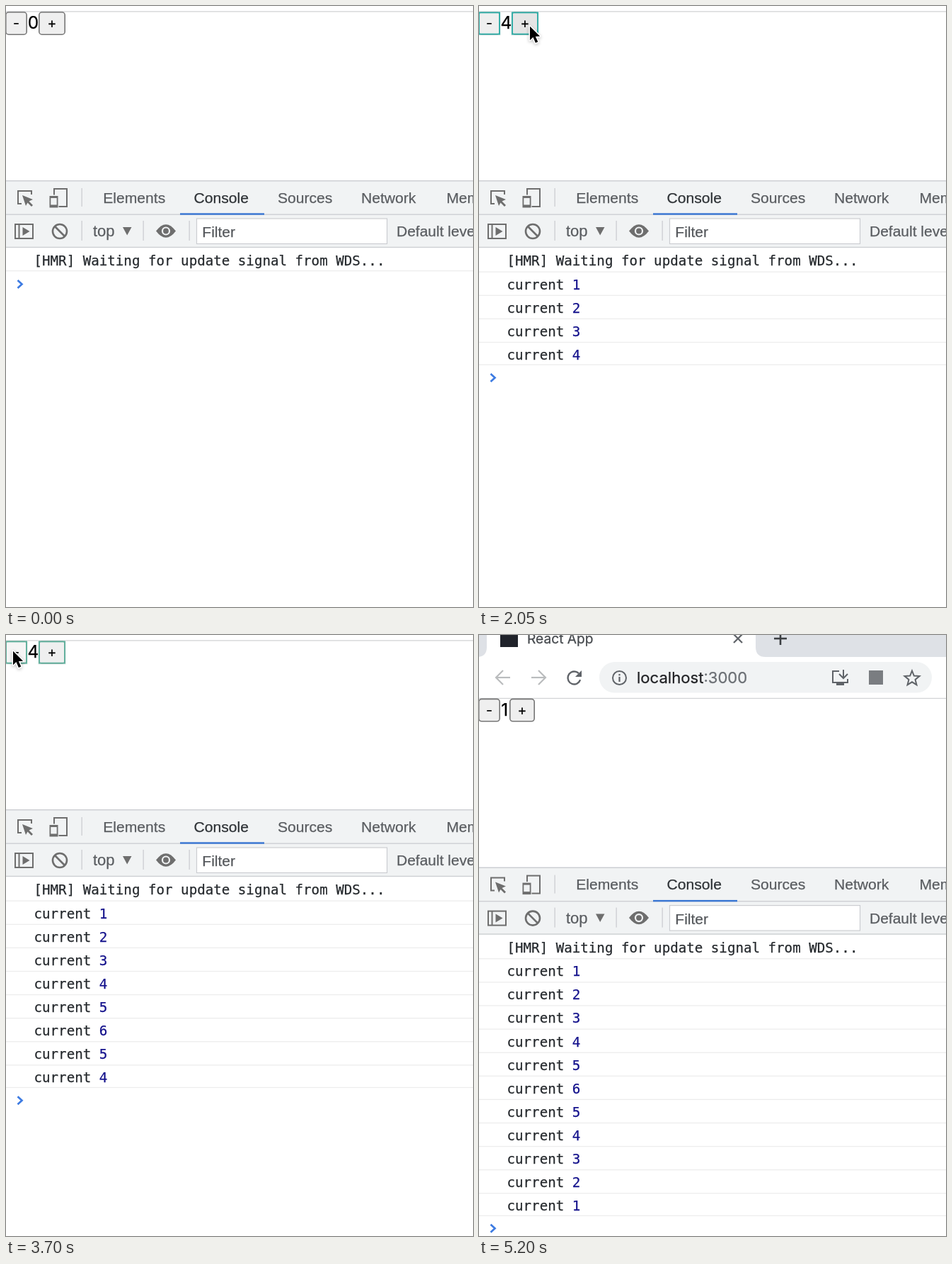
Write an HTML page with a canvas that moves like this. It is 660 px wide and 848 px high and loops after 5.54 s.

```html
<!DOCTYPE html>
<html lang="en">
<head>
<meta charset="utf-8">
<title>Counter</title>
<style>
  html, body { margin: 0; width: 100%; height: 100%; overflow: hidden; background: #fff; }
  canvas { display: block; width: 660px; height: 848px; }
</style>
</head>
<body>
<canvas id="stage" width="660" height="848"></canvas>
<script>
const ctx = document.getElementById('stage').getContext('2d');
const LOOP = 5540, TICK = 50, SCROLL = 81.6;
const SANS = '"Liberation Sans", Arial, sans-serif';
const UI = 'Inter, Roboto, sans-serif';
const MONO = '"DejaVu Sans Mono", monospace';
const ICON = '#6e6e6e', CHROME = '#5f6368', BAR = '#f1f3f4', EDGE = '#cbcdd1';
const HEAT = ['#37afa9', '#63b19e', '#80b393'];

// mouse down, re-render, new value, outline cleared
const clicks = [
  [800, 900, 1, 1150], [1200, 1300, 2, 1550], [1550, 1650, 3, 1950],
  [2000, 2050, 4, 2200], [2200, 2350, 5, 2550], [2550, 2550, 6, 2750],
  [3400, 3450, 5, 3600], [3550, 3600, 4, 3800], [3700, 3800, 3, 4100],
  [4100, 4200, 2, 4350], [4450, 4500, 1, 4750]
].map(([down, up, value, clear]) => ({ down, up, value, clear }));
clicks.forEach((c, i) => {
  const prev = clicks[i - 1];
  c.heat = prev && prev.clear >= c.up ? Math.min(prev.heat + 1, 2) : 0;
});

const clamp = v => Math.max(0, Math.min(1, v));
const smooth = v => v * v * (3 - 2 * v);

// a hairline stroke gives the slightly heavy screen rendering
function text(str, x, y, size, font, color, align = 'left') {
  ctx.font = `${size}px ${font}`;
  ctx.fillStyle = ctx.strokeStyle = color;
  ctx.textAlign = align;
  ctx.lineWidth = 0.25;
  ctx.fillText(str, x, y);
  ctx.strokeText(str, x, y);
}

function box(x, y, w, h, color) {
  ctx.fillStyle = color;
  ctx.fillRect(x, y, w, h);
}

function frame(x, y, w, h, color, width = 2) {
  ctx.strokeStyle = color;
  ctx.lineWidth = width;
  ctx.strokeRect(x, y, w, h);
}

function path(points, close) {
  ctx.beginPath();
  for (let i = 0; i < points.length; i += 2) ctx.lineTo(points[i], points[i + 1]);
  if (close) ctx.closePath();
}

function line(points, color, width = 2) {
  path(points);
  ctx.strokeStyle = color;
  ctx.lineWidth = width;
  ctx.stroke();
}

function poly(points, color) {
  path(points, true);
  ctx.fillStyle = color;
  ctx.fill();
}

function ring(x, y, r, color, width, from = 0, to = Math.PI * 2) {
  ctx.beginPath();
  ctx.arc(x, y, r, from, to);
  ctx.strokeStyle = color;
  ctx.lineWidth = width;
  ctx.stroke();
}

function rounded(x, y, w, h, r, fill, stroke) {
  ctx.beginPath();
  ctx.roundRect(x, y, w, h, r);
  ctx.fillStyle = fill;
  ctx.fill();
  if (!stroke) return;
  ctx.strokeStyle = stroke;
  ctx.lineWidth = 1.6;
  ctx.stroke();
}

function drawBrowser() {
  box(0, 0, 660, 31, '#dee1e6');
  box(11, -30, 380, 62, '#fff');
  // flared feet of the active tab
  for (const [x, dir] of [[11, -1], [391, 1]]) {
    ctx.beginPath();
    ctx.moveTo(x, 17);
    ctx.quadraticCurveTo(x, 31, x + dir * 14, 31);
    ctx.lineTo(x, 31);
    ctx.fillStyle = '#fff';
    ctx.fill();
  }
  box(30, -8, 25, 25, '#20232a');
  text('React App', 68, 11.5, 19.2, UI, '#45494d');
  line([360, -1, 372, 11], CHROME, 2.2);
  line([372, -1, 360, 11], CHROME, 2.2);
  line([417, 5, 435, 5], '#3c4043', 2.6);
  line([426, -4, 426, 14], '#3c4043', 2.6);

  box(0, 31, 660, 58, '#fff');
  line([44, 60, 24, 60], '#babcbe', 2.2);
  line([34, 50, 24, 60, 34, 70], '#babcbe', 2.2);
  line([74, 60, 94, 60], '#babcbe', 2.2);
  line([84, 50, 94, 60, 84, 70], '#babcbe', 2.2);
  ring(134.5, 60.5, 9, CHROME, 2.4, 0.3, 5.5);
  poly([145, 50, 145, 59, 136, 59], CHROME);

  rounded(170, 38, 470, 43.6, 21.8, BAR);
  ring(198.5, 60.5, 9.5, CHROME, 2);
  box(197.4, 59, 2.2, 7, CHROME);
  box(197.4, 55, 2.2, 2.3, CHROME);
  text('localhost', 223, 68, 22.1, UI, '#202124');
  const w = ctx.measureText('localhost').width;
  text(':3000', 223 + w, 68, 22.1, UI, '#6b6f74');

  line([509, 51, 500, 51, 500, 67, 521, 67, 521, 62], CHROME, 2);
  box(505, 67, 11, 4, CHROME);
  line([515, 49, 515, 60], CHROME, 2);
  line([509, 55, 515, 61, 521, 55], CHROME, 2);
  box(551, 50, 20, 20, '#7a7d81');
  const star = [];
  for (let i = 0; i < 10; i++) {
    const a = -Math.PI / 2 + i * Math.PI / 5, r = i % 2 ? 4.8 : 11;
    star.push(612 + r * Math.cos(a), 61.5 + r * Math.sin(a));
  }
  path(star, true);
  ctx.strokeStyle = CHROME;
  ctx.lineWidth = 2;
  ctx.stroke();
  box(0, 88.8, 660, 1.3, '#d3d4d6');
}

function drawTabs() {
  box(0, 246, 660, 95, BAR);
  box(0, 246, 660, 1.4, EDGE);
  box(0, 293.5, 660, 1.3, EDGE);
  box(0, 339.8, 660, 1.3, EDGE);

  line([22, 279, 17, 279, 17, 261, 36, 261, 36, 266], ICON, 2);
  poly([23, 267, 38, 273, 32.5, 275.5, 38, 281, 36, 283, 30.5, 277.5, 28, 282], ICON);
  frame(68, 258, 18, 25, ICON);
  box(60.5, 266.5, 14, 18.5, BAR);
  box(61.5, 268, 12, 16.5, ICON);
  box(63.3, 271, 8.4, 9.5, BAR);
  box(106.5, 257, 1.3, 26, EDGE);

  const tabs = [['Elements', 137.3], ['Console', 265.6], ['Sources', 384], ['Network', 502], ['Memory', 622.5]];
  for (const [name, x] of tabs) text(name, x, 277.5, 21.1, SANS, name === 'Console' ? '#2f3337' : '#5a5d61');
  box(246, 292.3, 119, 2.4, '#3876d3');
}

function drawToolbar() {
  frame(13, 308, 25, 20, ICON);
  line([18.5, 308, 18.5, 328], ICON, 2);
  poly([23.5, 312, 33.5, 318, 23.5, 324], ICON);
  ring(76, 318, 10, ICON, 2.6);
  line([69, 311, 83, 325], ICON, 2.6);
  for (const x of [106.5, 193.5, 258.5]) box(x, 303, 1.3, 28, EDGE);
  text('top', 123, 325, 22, SANS, '#5a5d61');
  poly([165, 312, 177.5, 312, 171.2, 323.5], ICON);

  ctx.beginPath();
  ctx.moveTo(212, 317.5);
  ctx.quadraticCurveTo(226, 299, 240, 317.5);
  ctx.quadraticCurveTo(226, 336, 212, 317.5);
  ctx.fillStyle = ICON;
  ctx.fill();
  ring(226, 317.5, 5, BAR, 2.2);

  box(269, 299.5, 270, 36.5, '#fff');
  frame(269.5, 300, 269, 35.5, EDGE, 1.2);
  text('Filter', 277.3, 326.4, 21, SANS, '#55585c');
  text('Default levels', 552, 325, 21, SANS, '#5a5d61');
}

function drawConsole(rows) {
  const step = 33.1, n = rows.length;
  text('[HMR] Waiting for update signal from WDS...', 39.5, 366.3, 19.17, MONO, '#25292d');
  rows.forEach((c, i) => {
    const y = 399.6 + i * step;
    text('current', 39.5, y, 19.17, MONO, '#25292d');
    text(c.value, 131.8, y, 19.17, MONO, '#14128c');
  });
  for (let i = 0; i <= n; i++) {
    box(0, 374.6 + i * step - (i === n ? 1.5 : 0), 660, 1.2, '#ececec');
  }
  const y = 392.4 + n * 33.03;
  line([16.5, y - 5.5, 22.5, y, 16.5, y + 5.5], '#3d7be2', 2.7);
}

function drawButton(label, x, w, state, heat) {
  const [fill, edge] = {
    idle: ['#efefef', '#767676'], hover: ['#e5e5e5', '#4f4f4f'], down: ['#f5f5f5', '#8d8d8d']
  }[state];
  rounded(x + 0.8, 8.8, w - 1.6, 31.4, 4, fill, edge);
  text(label, x + w / 2, 31, 19.5, UI, '#000', 'center');
  if (heat === undefined) return;
  frame(x - 0.3, 8, w + 0.6, 33, '#f0f0f0', 1);
  frame(x + 1, 9.3, w - 2, 30.4, HEAT[heat], 2);
}

// pointer tip, or null while it is hidden
function pointer(t) {
  if (t < 250 || t >= 4850) return null;
  if (t < 2900) {
    const u = smooth(clamp((t - 200) / 550)), v = 1 - u;
    const mix = (a, b, c, d) => v * v * v * a + 3 * v * v * u * b + 3 * v * u * u * c + u * u * u * d;
    return [mix(8, 70, 118, 71), mix(360, 290, 110, 27)];
  }
  const u = smooth(clamp((t - 2850) / 400));
  return [71 - 62 * u, 27 - 6 * u];
}

function drawPointer([x, y]) {
  ctx.save();
  ctx.translate(x + 1, y + 1.8);
  ctx.scale(0.88, 0.88);
  path([0, 0, 0, 22, 5, 17.4, 9, 26.5, 12.8, 24.8, 8.9, 16, 16, 15.8], true);
  ctx.shadowColor = 'rgba(0,0,0,.25)';
  ctx.shadowBlur = 4;
  ctx.shadowOffsetY = 1.5;
  ctx.lineJoin = 'round';
  ctx.lineWidth = 3.6;
  ctx.strokeStyle = '#fff';
  ctx.stroke();
  ctx.shadowColor = 'transparent';
  ctx.fillStyle = '#000';
  ctx.fill();
  ctx.restore();
}

function drawCounter(t, rows, tip) {
  const last = rows[rows.length - 1];
  const value = last ? last.value : 0;
  const heat = last && t < last.clear ? last.heat : undefined;
  const pressed = clicks.some(c => t >= c.down && t < c.up);
  const one = value === 1;
  const plus = one ? 43 : 46, width = one ? 36 : 38;
  const state = (x, w) => {
    const over = tip && tip[0] >= x && tip[0] < x + w && tip[1] > 8 && tip[1] < 41;
    return !over ? 'idle' : pressed ? 'down' : 'hover';
  };
  drawButton('-', -1, 31, state(-1, 31), heat);
  drawButton('+', plus, width, state(plus, width), heat);
  text(value, one ? 36.3 : 38.4, 32, 24.5, UI, '#000', 'center');
}

function draw(now) {
  const t = Math.floor((now % LOOP) / TICK) * TICK;
  const rows = clicks.filter(c => t >= c.up);
  const tip = pointer(t);
  const k = clamp((t - 4950) / 250);
  const shift = SCROLL * (1 - (1 - k) * (1 - k));

  box(0, 0, 660, 848, '#fff');
  ctx.save();
  ctx.translate(0, shift - SCROLL);
  drawBrowser();
  ctx.restore();
  ctx.save();
  ctx.translate(0, shift);
  drawCounter(t, rows, tip);
  drawTabs();
  drawToolbar();
  drawConsole(rows);
  if (tip) drawPointer(tip);
  ctx.restore();
}

let start;
function tick(now) {
  start ??= now;
  draw(now - start);
  requestAnimationFrame(tick);
}
draw(0);
requestAnimationFrame(tick);
</script>
</body>
</html>
```
